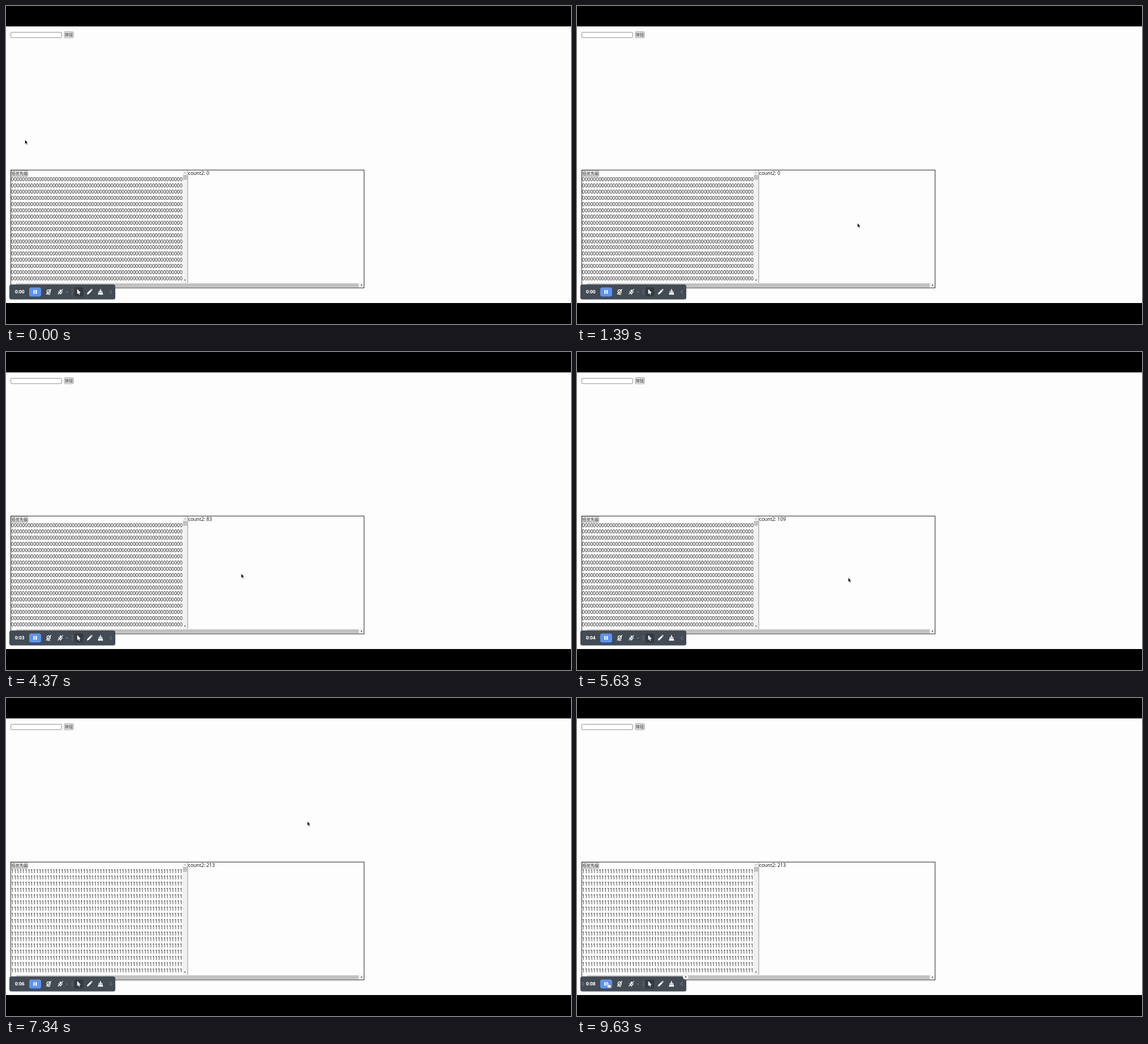
Recreate the animation shown at these times as an HTML page. Size 998 by 561 pixels, loop 9.68 s.

```html
<!DOCTYPE html>
<html lang="zh">
<head>
<meta charset="utf-8">
<title>Priority demo</title>
<style>
  html, body { margin: 0; width: 100%; height: 100%; overflow: hidden; background: #000; }
  svg { display: block; }
  text { font: 8.55px "Noto Sans", "Open Sans", sans-serif; fill: #1c1c1c; white-space: pre; }
  .label { font: 7px "Noto Sans CJK SC", "Noto Sans CJK", sans-serif; }
  .clock { font-weight: 700; font-size: 8.5px; fill: #fff; }
  .control { fill: #efefef; stroke: #767676; stroke-width: .7; }
  .track { fill: #f1f1f1; }
  .thumb { fill: #c1c1c1; }
  .icon { fill: none; stroke: #fff; stroke-width: 1.25; stroke-linecap: round; stroke-linejoin: round; }
  .solid { fill: #fff; }
  .dim { stroke: #9aa0a6; stroke-width: 1; }
</style>
</head>
<body>
<svg width="998" height="561" viewBox="0 0 998 561">
  <rect y="36" width="998" height="488" fill="#fdfdfd"/>

  <rect x="8.5" y="46.4" width="89.8" height="9.4" rx="1" fill="#fff" stroke="#767676" stroke-width=".8"/>
  <rect class="control" x="103" y="45.4" width="16" height="10.6" rx="1.2"/>
  <text class="label" x="104" y="53.3">按钮</text>

  <!-- scrolling panel -->
  <g id="rows"></g>
  <rect class="control" x="9.2" y="290.1" width="29.3" height="10.4" rx="1.2"/>
  <text class="label" x="9.9" y="297.9">低优先级</text>
  <rect class="track" x="312" y="290" width="8.6" height="198.5"/>
  <rect class="thumb" x="312.7" y="298" width="7.2" height="8.6"/>
  <path d="M314.5 295l1.7-1.8 1.7 1.8z" fill="#999"/>
  <path d="M314.5 482.8h3.4l-1.7 1.9z" fill="#444"/>
  <path d="M321 290V488.5" stroke="#777" stroke-width=".8"/>
  <rect class="track" x="9" y="488.6" width="623" height="8.4"/>
  <rect class="thumb" x="18" y="489.4" width="605" height="6.6"/>
  <path d="M627.3 490.8v3.6l2-1.8z" fill="#333"/>
  <rect x="8.5" y="289.4" width="624" height="207.9" fill="none" stroke="#2c2c2c"/>
  <text id="count" x="321.8" y="297.9"></text>

  <!-- recorder bar -->
  <rect x="5.6" y="492" width="187.8" height="26.5" rx="4" fill="#000" opacity=".12"/>
  <rect x="6" y="491.2" width="187" height="26.2" rx="3.5" fill="#434b54"/>
  <text class="clock" id="clock" x="15.7" y="507.2"></text>
  <rect x="41" y="496.4" width="21" height="16" rx="3.5" fill="#5b93f7"/>
  <path class="solid" d="M48.3 501.1h2.3v6.6h-2.3zM52.2 501.1h2.3v6.6h-2.3z"/>
  <g class="icon">
    <circle cx="75.3" cy="503.7" r="3"/>
    <path d="M73.2 508.7h4.4M71.2 508.4l8.3-8.6"/>
    <rect class="solid" x="94.8" y="500.2" width="2.6" height="4.6" rx="1.3" stroke="none"/>
    <path d="M93 503.6q.4 3.1 3.1 3.1t3.1-3.1M96.1 506.7v2M92 508.3l8.2-8.4"/>
    <path class="dim" d="M117 500v9" stroke-opacity=".5"/>
    <path class="dim" d="M186.4 501.4l-2.8 2.9 2.8 2.9"/>
  </g>
  <path d="M106.3 504h3l-1.5 1.8z" fill="#aaa"/>
  <rect x="121" y="496.4" width="15.5" height="16" rx="3" fill="#343a40"/>
  <path class="solid" d="M125.8 499.3v9l2-1.8 1.5 3 1.3-.7-1.4-2.9h2.8z"/>
  <path class="solid" d="M143 508.9l.6-2.8 5.6-5.6 2.2 2.2-5.6 5.6zM149.8 499.9l.7-.7q.5-.4 1 0l1.1 1.1q.4.5 0 1l-.7.7z"/>
  <path class="solid" d="M166.1 499.5h1.6v3.2h2.5v1.7h-6.6v-1.7h2.5zM163.2 505.2h7.4l.9 4h-9.2z"/>
  <g id="hover">
    <path d="M9 501v7M11.2 501v7" stroke="#9299a0" stroke-dasharray="1.2 1"/>
    <circle cx="192" cy="491.7" r="5" fill="#fff" stroke="#aaa" stroke-width=".5"/>
    <path d="M190.2 489.9l3.6 3.6M193.8 489.9l-3.6 3.6" stroke="#333" stroke-width=".9"/>
  </g>

  <g id="pointer">
    <path id="arrow" d="M0 0v7.5l1.7-1.5 1.3 2.8 1.3-.6-1.3-2.7h2.3z" fill="#000" stroke="#fff" stroke-width=".5"/>
    <path id="hand" d="M-.9.6Q0-.7.9.6v3l3 .7q1 .3.9 1.4l-.6 3.6h-4.8l-2.7-3.4q-.3-1.1.8-1l1.6 1z" fill="#fff" stroke="#333" stroke-width=".5"/>
  </g>
</svg>
<script>
const LOOP = 9680, COMMIT = 7120, ROWS = 17, COLUMNS = 62;
const $ = id => document.getElementById(id);

// The pointer eases between stops and circles on the way where "loops" is set.
const stops = [
  { t: 0, x: 33.5, y: 236 },
  { t: 690, x: 25, y: 295 },
  { t: 910, x: 25, y: 295 },
  { t: 1390, x: 495, y: 383, loops: 2 },
  { t: 3080, x: 540.7, y: 357, loops: 1 },
  { t: 4370, x: 415, y: 391, loops: 3 },
  { t: 6990, x: 510.7, y: 324 },
  { t: 7340, x: 532.4, y: 217.7 },
  { t: 8800, x: 540, y: 300 },
  { t: 9500, x: 55.5, y: 502 },
  { t: LOOP, x: 55.5, y: 502 }
];

function pointerAt(t) {
  const i = stops.findIndex(s => s.t > t), a = stops[i - 1], b = stops[i];
  const u = (t - a.t) / (b.t - a.t), e = u * u * (3 - 2 * u);
  const turn = 2 * Math.PI * u * (a.loops || 0);
  return {
    x: a.x + (b.x - a.x) * e + 55 * Math.sin(turn),
    y: a.y + (b.y - a.y) * e + 20 * (1 - Math.cos(turn))
  };
}

// Counting slows down, then the queued updates land at once.
function countAt(t) {
  const seconds = Math.max(0, t - 1570) / 1000;
  return t < COMMIT ? Math.floor(39.5 * seconds ** 0.726) : 213;
}

const rows = Array.from({ length: ROWS }, (_, i) => {
  const row = document.createElementNS("http://www.w3.org/2000/svg", "text");
  row.setAttribute("x", 8.8);
  row.setAttribute("y", 309.2 + i * 10.93);
  return $("rows").appendChild(row);
});

function setText(node, value) {
  if (node.textContent !== value) node.textContent = value;
}
const show = (id, on) => $(id).style.display = on ? "" : "none";

function draw() {
  const t = performance.now() % LOOP, { x, y } = pointerAt(t);
  const digits = (t < COMMIT ? "0" : "1").repeat(COLUMNS);
  rows.forEach(row => setText(row, digits));
  setText($("count"), "count2: " + countAt(t));
  setText($("clock"), "0:0" + Math.max(0, Math.floor((t - 1030) / 1000)));
  $("pointer").setAttribute("transform", `translate(${x.toFixed(2)} ${y.toFixed(2)})`);
  const onBar = x < 193 && y > 491, onPause = onBar && x < 62;
  show("hover", onBar);
  show("hand", onPause);
  show("arrow", !onPause);
  requestAnimationFrame(draw);
}
draw();
</script>
</body>
</html>
```
